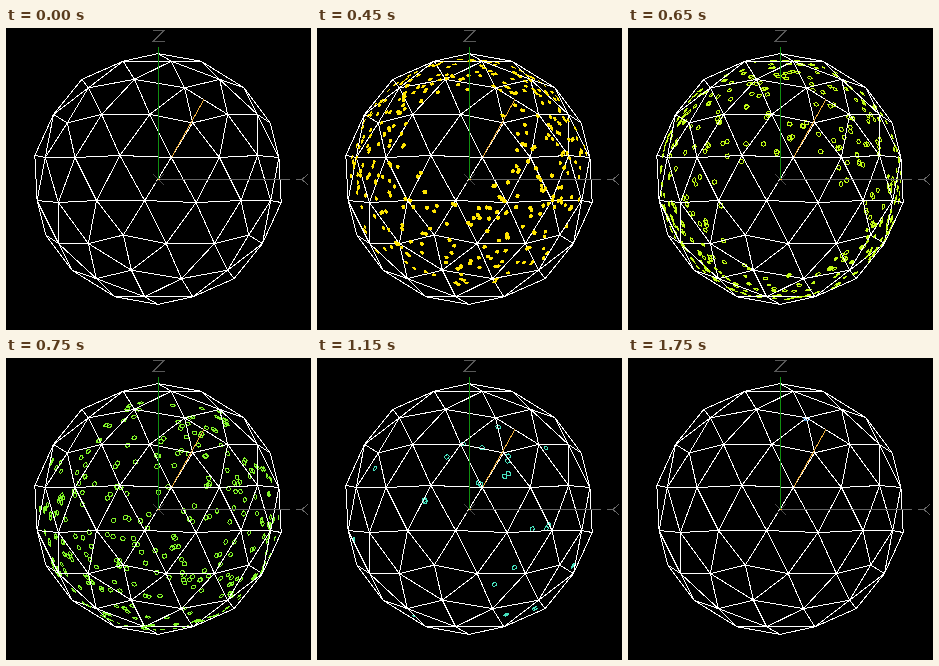
Animation of 305x302 px, one loop 1.8 s. Source, as an HTML page:

```html
<!DOCTYPE html>
<html lang="en">
<head>
<meta charset="utf-8">
<title>Hits on a sphere</title>
<style>
  html, body { margin: 0; width: 100%; height: 100%; overflow: hidden; background: #000; }
  svg { display: block; width: 305px; height: 302px; shape-rendering: crispEdges; }
  path { fill: none; stroke-width: 1; }
</style>
</head>
<body>
<svg viewBox="0 0 305 302">
  <path id="rings"/>
  <path id="mesh" stroke="#fff"/>
  <path d="M152.5 151.5H284M290 151.5H296M302 146L296 151.5L302 157" stroke="#666"/>
  <path d="M147 146L158 157M158 146L147 157" stroke="#4a4a4a"/>
  <path d="M146.5 2.5H158L147 13.5H158.5" stroke="#585858"/>
  <path d="M198 71.5L166 128.5" stroke="#f0b040"/>
  <path id="solid"/>
  <path d="M152.5 19V151" stroke="#109010"/>
  <path d="M152 151.5h2" stroke="#f0b040"/>
</svg>
<script>
const CX = 152, CY = 151, R = 125.4, HIT_R = 120.5, STEP = 50, STEPS = 36;
const byId = id => document.getElementById(id);
const mix = (a, b, u) => a + (b - a) * u;
const rad = deg => deg * Math.PI / 180;
const unit = p => {
  const len = Math.hypot(...p);
  return p.map(v => v / len);
};

// Geodesic sphere: an icosahedron with each edge cut in three, near side only.
function meshPath() {
  const h = 1 / Math.sqrt(5);
  const ring = (deg, z) => [0, 1, 2, 3, 4].map(k => {
    const a = rad(deg + 72 * k);
    return [2 * h * Math.sin(a), -z, 2 * h * Math.cos(a)];
  });
  const top = [0, -1, 0], bottom = [0, 1, 0];
  const up = ring(18, h), low = ring(54, -h);
  const sub = (a, b) => a.map((v, i) => v - b[i]);
  const dot = (a, b) => a.reduce((s, v, i) => s + v * b[i], 0);
  const cross = (a, b) => [a[1] * b[2] - a[2] * b[1], a[2] * b[0] - a[0] * b[2], a[0] * b[1] - a[1] * b[0]];
  const place = p => (CX + R * p[0]).toFixed(2) + ' ' + (CY + R * p[1]).toFixed(2);
  let d = '';

  function triangle(a, b, c) {
    const n = cross(sub(b, a), sub(c, a));
    if (n[2] * Math.sign(dot(n, a)) > 1e-6) d += `M${place(a)}L${place(b)}L${place(c)}Z`;
  }
  function face(a, b, c) {
    const point = (i, j) => unit(a.map((v, k) => v * (3 - i - j) + b[k] * i + c[k] * j));
    for (let i = 0; i < 3; i++) {
      for (let j = 0; i + j < 3; j++) {
        triangle(point(i, j), point(i + 1, j), point(i, j + 1));
        if (i + j < 2) triangle(point(i + 1, j), point(i + 1, j + 1), point(i, j + 1));
      }
    }
  }
  for (let k = 0; k < 5; k++) {
    const n = (k + 1) % 5;
    face(top, up[k], up[n]);
    face(up[k], up[n], low[k]);
    face(low[k], low[n], up[n]);
    face(bottom, low[k], low[n]);
  }
  return d;
}

function seeded(seed) {
  let s = seed * 7919 + 17;
  return () => {
    s = (s + 0x6D2B79F5) | 0;
    let t = Math.imul(s ^ (s >>> 15), 1 | s);
    t = (t + Math.imul(t ^ (t >>> 7), 61 | t)) ^ t;
    return ((t ^ (t >>> 14)) >>> 0) / 4294967296;
  };
}

// A front of hits sweeps the sphere from AXIS (near side) to its antipode (far side).
// lo, hi: the band it covers, in degrees from AXIS; lean: pull towards the upper right.
const AXIS = [-.06, -.34, .94], UP = [0, -.94, -.34], SIDE = [1, 0, .06];
const keys = [
  { t: 50, n: 8, lo: 0, hi: 9, lean: 0, rgb: [255, 90, 0] },
  { t: 300, n: 165, lo: 2, hi: 39, lean: 0, rgb: [255, 190, 0] },
  { t: 550, n: 430, lo: 47, hi: 107, lean: 0, rgb: [255, 255, 0] },
  { t: 750, n: 265, lo: 97, hi: 180, lean: 0, rgb: [130, 245, 40] },
  { t: 950, n: 80, lo: 98, hi: 165, lean: .8, rgb: [70, 220, 90] },
  { t: 1150, n: 20, lo: 100, hi: 160, lean: .8, rgb: [70, 225, 190] },
  { t: 1350, n: 6, lo: 105, hi: 150, lean: 1, rgb: [100, 185, 255] },
  { t: 1750, n: 1, lo: 95, hi: 130, lean: 1, rgb: [60, 140, 210] }
];

function sample(lo, hi, lean, rand) {
  const cos = mix(Math.cos(rad(lo)), Math.cos(rad(hi)), rand());
  const theta = Math.acos(cos) + rad(10) * (rand() + rand() - 1);
  const s = rand() * 2 - 1;
  const phi = rad(25) + Math.PI * s * Math.abs(s) ** lean;
  const c = Math.cos(theta), r = Math.sin(theta);
  return unit(AXIS.map((v, i) => v * c + r * (UP[i] * Math.cos(phi) + SIDE[i] * Math.sin(phi))));
}

// Hexagon lying flat on the sphere.
function hexagon([px, py, pz], size) {
  const rho = Math.hypot(px, py) || 1e-6;
  const ux = px / rho, uy = py / rho;
  const x = CX + .5 + HIT_R * px, y = CY + .5 + HIT_R * py;
  let d = '';
  for (let k = 0; k < 6; k++) {
    const a = k * Math.PI / 3;
    const side = size * Math.cos(a), out = size * Math.sin(a) * pz;
    d += (k ? 'L' : 'M') + (x - uy * side + ux * out).toFixed(1) + ' ' + (y + ux * side + uy * out).toFixed(1);
  }
  return d + 'Z';
}

function hits(step) {
  const t = step * STEP;
  if (!step) return { solid: '', rings: '', color: '#000' };
  const i = Math.min(keys.findLastIndex(k => k.t <= t), keys.length - 2);
  const a = keys[i], b = keys[i + 1], u = (t - a.t) / (b.t - a.t);
  const at = name => mix(a[name], b[name], u);
  const rand = seeded(step);
  let solid = '', rings = '';

  // Discs are seen filled on the near side, as outlines on the far side.
  function add(p) {
    if (p[2] > 0) solid += hexagon(p, 1.8);
    else rings += hexagon(p, 2.5);
  }
  for (let k = Math.round(at('n')); k > 0; k--) {
    const p = sample(at('lo'), at('hi'), at('lean'), rand);
    add(p);
    if (rand() < .2) add(unit(p.map(v => v + (rand() - .5) * .07)));
  }
  const color = `rgb(${a.rgb.map((v, k) => Math.round(mix(v, b.rgb[k], u)))})`;
  return { solid, rings, color };
}

const solid = byId('solid'), rings = byId('rings');
const poses = Array.from({ length: STEPS }, (_, i) => hits(i));
byId('mesh').setAttribute('d', meshPath());

const start = performance.now();
let shown = -1;
function draw() {
  const step = Math.floor((performance.now() - start) / STEP) % STEPS;
  if (step !== shown) {
    const pose = poses[shown = step];
    solid.setAttribute('d', pose.solid);
    rings.setAttribute('d', pose.rings);
    solid.style.fill = solid.style.stroke = rings.style.stroke = pose.color;
  }
  requestAnimationFrame(draw);
}
draw();
</script>
</body>
</html>
```
